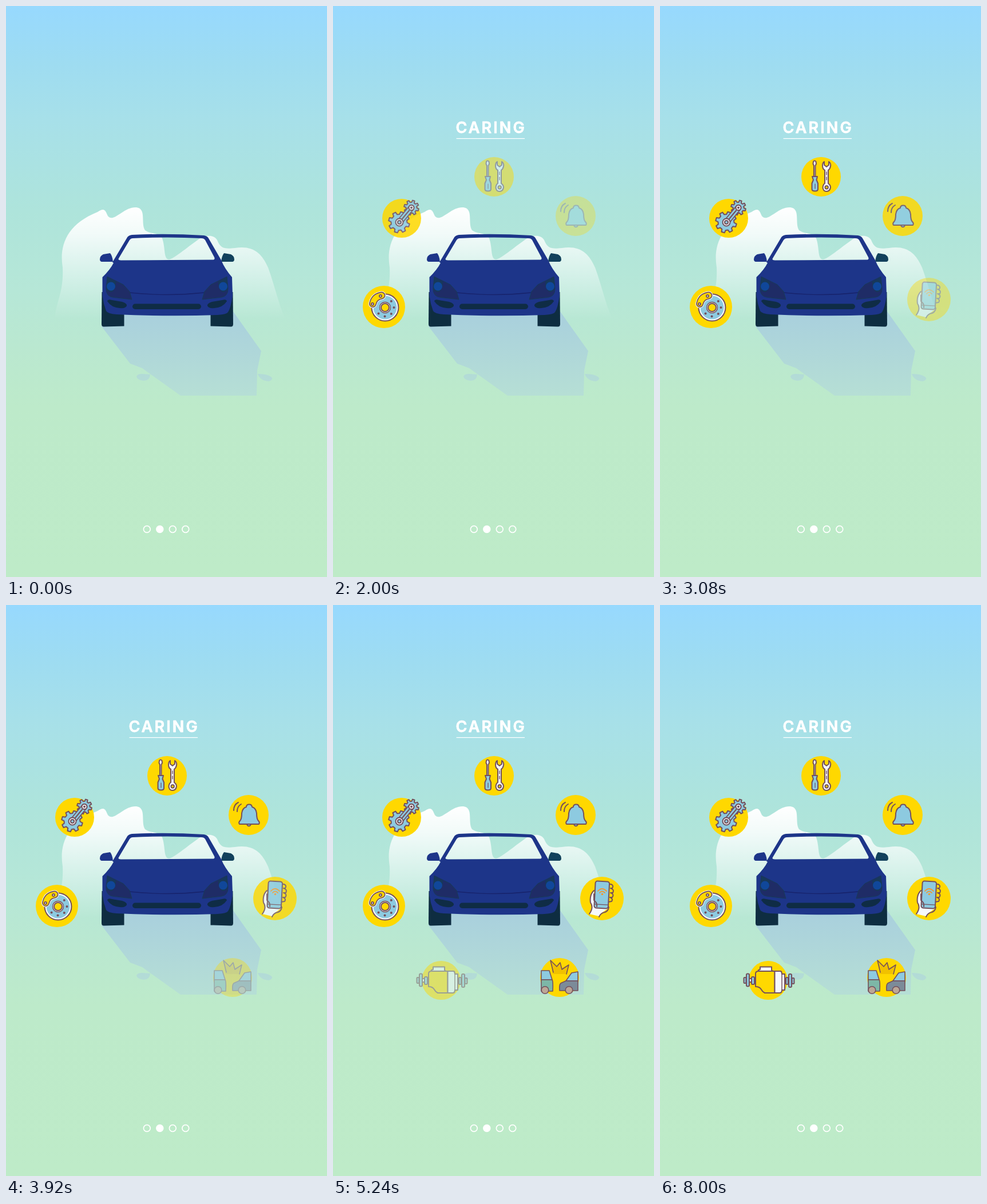
Animation, 561 px wide and 998 px high, one loop 8040 ms. Source, as an HTML page:

```html
<!DOCTYPE html>
<html lang="en">
<head>
<meta charset="utf-8">
<title>Caring</title>
<style>
html, body { margin: 0; width: 100%; height: 100%; overflow: hidden; background: #beeac8; }
svg { display: block; width: 100vw; height: 100vh; }
.icon { fill: none; stroke: #74505c; stroke-width: 2; stroke-linejoin: round; stroke-linecap: round; }
.disc { fill: #ffd800; stroke: none; }
.y { fill: #ffd800; } .b { fill: #8dcae0; } .w { fill: #f6f9fc; } .d { fill: #74505c; stroke: none; }
#title { font: 600 27px Inter, "Open Sans", sans-serif; letter-spacing: 3.1px; fill: #fff;
  stroke: #fff; stroke-width: .8; stroke-linejoin: round; }
</style>
</head>
<body>
<svg viewBox="0 0 561 998" preserveAspectRatio="none">
  <defs>
    <linearGradient id="sky" x2="0" y2="1">
      <stop stop-color="#97d9fe"/><stop offset=".1" stop-color="#9edcf1"/>
      <stop offset=".2" stop-color="#a7e0e9"/><stop offset=".36" stop-color="#aee4db"/>
      <stop offset=".5" stop-color="#b6e7d7"/><stop offset=".6" stop-color="#bae8d0"/>
      <stop offset=".7" stop-color="#bdeaca"/><stop offset="1" stop-color="#beebc8"/>
    </linearGradient>
    <linearGradient id="mist" gradientUnits="userSpaceOnUse" x1="0" y1="352" x2="0" y2="547">
      <stop stop-color="#fff"/><stop offset=".25" stop-color="#fff" stop-opacity=".82"/>
      <stop offset="1" stop-color="#fff" stop-opacity="0"/>
    </linearGradient>
    <linearGradient id="shade" gradientUnits="userSpaceOnUse" x1="0" y1="540" x2="0" y2="682">
      <stop stop-color="#a9d0dd"/><stop offset="1" stop-color="#b6dfd5"/>
    </linearGradient>
    <path id="tyre" fill="#0e2d41" d="M167.500 500H206.500V559.500L171 560.500Q167 560.500 167 556Z"/>
    <g id="lamps">
      <path fill="#1f2c66" stroke="#173b58" stroke-width="1" d="M177 473L205 487L216 499L220 513L186 509Q175 507 175 494Z"/>
      <path fill="#17395a" d="M177 474L192 482Q192 497 184 500Q176 499 175 492Z"/>
      <circle cx="183.500" cy="490" r="7.500" fill="#10479a"/>
      <path fill="#0f2c45" d="M177 516Q178 512 185 514L203 517Q212 520 211 524Q209 529 199 528Q184 527 177 516Z"/>
    </g>
    <path id="mirror" d="M164 443Q164 437 170 434L182 432Q186 437 187 447L167 447Q164 446 164 443Z"/>
  </defs>

  <rect width="561" height="998" fill="url(#sky)"/>
  <path fill="url(#mist)" d="M85 547C88 515 101 500 99 457C93 420 105 382 160 360C173 351 174 359 178 367C188 380 206 350 228 352C246 354 235 380 243 392C252 399 266 395 273 406C279 423 275 443 285 443C293 442 315 423 335 409C347 400 363 399 369 409C375 424 382 425 400 423C432 418 447 432 458 457C470 490 476 520 488 547Z"/>

  <g fill="url(#shade)">
    <path d="M167 560L217 625L238 633L305 681H438L439 637L446 603L397 534H180Z"/>
    <path d="M228 648Q229 643 238 643L252 644Q251 655 241 655Q230 654 228 648ZM440 643Q459 643 465 650Q466 654 459 656Q444 655 440 643Z"/>
  </g>

  <use href="#tyre"/>
  <use href="#tyre" transform="matrix(-1 0 0 1 564 0)"/>
  <use href="#mirror" fill="#1d3589"/>
  <use href="#mirror" transform="matrix(-1 0 0 1 563 0)" fill="#12415c"/>
  <path fill="#1d3589" fill-rule="evenodd" d="M186 448L211 406Q213 401 220 400Q282 397 346 401Q352 402 354 406L376 444Q382 459 395 474L396 506Q393 528 388 535Q386 539 370 540Q282 543 193 539Q178 538 175 533Q170 520 168.500 506V474Q182 461 188 449ZM197 441Q195 444.500 201 444.500L361 443.500Q366 443.500 364 439L348 409Q346 406 342 406Q282 403 221 406Q218 406 216 409Z"/>
  <path fill="none" stroke="#17236c" stroke-width="1.300" d="M216 501Q282 508 346 501"/>
  <use href="#lamps"/>
  <use href="#lamps" transform="matrix(-1 0 0 1 563 0)"/>
  <rect x="221" y="520.500" width="120" height="9.500" rx="4.700" fill="#0f2c45"/>

  <g class="icon" data-start="0">
    <circle class="disc" cx="89" cy="526" r="37"/>
    <circle class="w" cx="91" cy="527" r="23.500"/>
    <circle class="b" cx="91" cy="527" r="20.500" style="stroke:none"/>
    <circle class="w" cx="91" cy="527" r="9.500" stroke-width="1.500"/>
    <circle class="y" cx="91" cy="527" r="7"/>
    <g id="holes" class="d"></g>
    <path d="M69.500 520.500Q72 508 85 506" style="stroke:#f6f9fc;stroke-width:15"/>
    <path d="M69.500 520.500Q72 508 85 506" style="stroke-width:13"/>
    <path d="M69.500 520.500Q72 508 85 506" style="stroke:#ffd800;stroke-width:9.500"/>
    <circle cx="69" cy="521" r="2" class="w"/><circle cx="83" cy="507" r="2" class="w"/>
  </g>

  <g class="icon" data-start="280">
    <circle class="disc" cx="120" cy="371" r="34"/>
    <path class="b gear" data-at="115.500,378,18.500,14"/>
    <path class="b gear" data-at="137,352.500,13,9.500"/>
    <path d="M116 378L137 352.500" style="stroke-width:11"/>
    <path d="M116 378L137 352.500" style="stroke:#8dcae0;stroke-width:7.500"/>
    <path d="M121 372L133 357.500" style="stroke-width:2"/>
    <circle class="w" cx="116" cy="378" r="6.500"/><circle class="b" cx="116" cy="378" r="3"/>
    <circle class="w" cx="137" cy="352.500" r="4.500"/><circle class="d" cx="137" cy="352.500" r="2"/>
  </g>

  <g class="icon" data-start="1040">
    <circle class="disc" cx="281.500" cy="298.500" r="34.500"/>
    <path class="w" d="M268 272Q270 269 272.500 272L273 276L271.500 279V298H269V279L267.500 276Z"/>
    <path class="b" d="M266 298H275L273.500 304L276 310V320Q276 323.500 271 323.500Q265.500 323.500 265.500 320V310L268 304Z"/>
    <path d="M271 311V319" style="stroke-width:1.200"/>
    <path class="w" d="M287 272V278L291 281L295 278V272Q299 275 298 280Q297 285 294 287V310Q298 313 298 317Q297 324 291 324Q285 324 284.500 317Q285 312 288 310V287Q284 285 284 279Q284 274 287 272Z"/>
    <circle class="y" cx="291.200" cy="317" r="2.700"/>
    <path d="M291 290V304" style="stroke-width:1.500" stroke-dasharray="5 4"/>
  </g>

  <g class="icon" data-start="1400">
    <circle class="disc" cx="424" cy="367" r="35"/>
    <circle class="b" cx="424.500" cy="383" r="3.300"/>
    <path class="b" d="M408 383Q406 380 409 377Q412 374 412 364Q413 355 420 353Q420 348.500 425 348.500Q429.500 348.500 430 353Q437 355 438 364Q438 374 441 377Q444 380 442 383Z"/>
    <path d="M398 359Q398 349 406 345M404 361Q404 352 411 348"/>
  </g>

  <g class="icon" data-start="2280">
    <circle class="disc" cx="470" cy="513" r="38"/>
    <path class="w" style="stroke:none" d="M456 499Q448 507 450 520Q456 529 448 540L465 544L470 538L481 530H458Z"/>
    <path d="M456 499Q448 507 450 520Q456 529 448 540M465 545Q468 538 475 537Q481 535 482 528"/>
    <path class="y" d="M481 488H486Q491 490 488 495H485Q492 497 489 503H485Q492 505 488 511H484Q490 513 487 518L481 519Z"/>
    <g transform="rotate(3 470 507)">
      <rect class="b" x="457.500" y="483" width="24.500" height="47" rx="3.500"/>
      <path d="M458 523.500H481.500" style="stroke-width:1.300"/>
    </g>
    <path d="M463 500Q470 492 478 500M466 503Q470 498 475 503" style="stroke:#ed9a37;stroke-width:1.800"/>
    <circle cx="470.500" cy="505.500" r="1.800" fill="#ed9a37" stroke="none"/>
    <path d="M456 505L456 516Q462 520 461 527"/>
  </g>

  <g class="icon" data-start="3200" style="stroke-width:1.600">
    <circle class="disc" cx="396" cy="651" r="34"/>
    <path fill="#f1c100" stroke="none" d="M384 645L380 621L391 630L396 624L400 634L412 629L407 645Z"/>
    <path d="M385 642L380 621L391 632L397 625L400 637L412 629L408 645"/>
    <path class="b" d="M364 639H378L383 655H364Z"/>
    <path fill="#7db7a7" d="M364 655H383Q385 658 384 675H364Z"/>
    <path class="b" d="M428 641L417 643L407 657H428Z"/>
    <path fill="#7c8b99" d="M428 657H407L398 661Q395 664 396 674H428Z"/>
    <circle cx="370.500" cy="673" r="6.300" fill="#bda796"/><circle cx="412.500" cy="673" r="6.300" fill="#bda796"/>
  </g>

  <g class="icon" data-start="4280">
    <circle class="disc" cx="189" cy="656" r="34"/>
    <path class="w" d="M155 653H167V659H155ZM218 653H226V660H218Z"/>
    <g class="b">
      <rect x="146.500" y="651" width="4" height="10" rx="1.500"/><rect x="151" y="644.500" width="5" height="22" rx="2"/>
      <rect x="160" y="650" width="5" height="13" rx="1.500"/>
      <rect x="220" y="651" width="4" height="12" rx="1.500"/><rect x="225" y="645" width="5" height="23" rx="2"/>
      <rect x="230.500" y="652" width="4" height="10" rx="1.500"/>
    </g>
    <path class="y" d="M167 644Q167 641 171 640H200.500V678H183Q179 676 177 672Q174 667 167 667Z"/>
    <path class="w" d="M172 640V638L175 637V632.500H195V638L197 640ZM200.500 640H211Q213 641 213 645H218V673H213Q213 678 209 678H200.500Z"/>
    <path d="M213 645V673" style="stroke-width:1.500"/>
  </g>

  <text id="title" x="214.500" y="222">CARING</text>
  <path id="rule" stroke="#fff" stroke-width="1.300"/>
  <g id="dots" stroke="#fff" stroke-width="1.700"></g>
</svg>
<script>
const LOOP = 8040, FADE = 2000;
const $ = id => document.getElementById(id);
const ramp = (t, start, length) => Math.max(0, Math.min(1, (t - start) / length));
const polar = (x, y, r, a) => [x + r * Math.cos(a), y + r * Math.sin(a)];

// Eight flat teeth: two points on the rim, two at the root
function gearPath(x, y, outer, inner) {
  const points = [];
  for (let i = 0; i < 32; i++) {
    const a = (i + (i % 2 ? .25 : -.25)) * Math.PI / 16 + .2;
    points.push(polar(x, y, i % 4 < 2 ? outer : inner, a).map(v => v.toFixed(1)));
  }
  return "M" + points.join("L") + "Z";
}
for (const gear of document.querySelectorAll(".gear"))
  gear.setAttribute("d", gearPath(...gear.dataset.at.split(",").map(Number)));

const circle = (x, y, r, fill) => `<circle cx="${x}" cy="${y}" r="${r}" fill="${fill}"/>`;
$("holes").innerHTML = [-.8, 0, .8, 1.6, 2.4].map(a => circle(...polar(91, 527, 15.5, a), 2, "#74505c")).join("");
$("dots").innerHTML = [0, 1, 2, 3].map(i => circle(246.3 + i * 22.5, 914.5, 5.9, i == 1 ? "#fff" : "none")).join("");

const icons = [...document.querySelectorAll(".icon")];
function draw(t) {
  for (const icon of icons) icon.style.opacity = ramp(t, +icon.dataset.start, FADE);
  $("title").style.opacity = ramp(t, 0, 900);
  const half = 59.7 * ramp(t, 480, 1320);
  $("rule").setAttribute("d", `M${275.3 - half} 231.6H${275.3 + half}`);
}

let begin;
function tick(now) {
  begin ??= now;
  draw((now - begin) % LOOP);
  requestAnimationFrame(tick);
}
draw(0);
requestAnimationFrame(tick);
</script>
</body>
</html>
```
